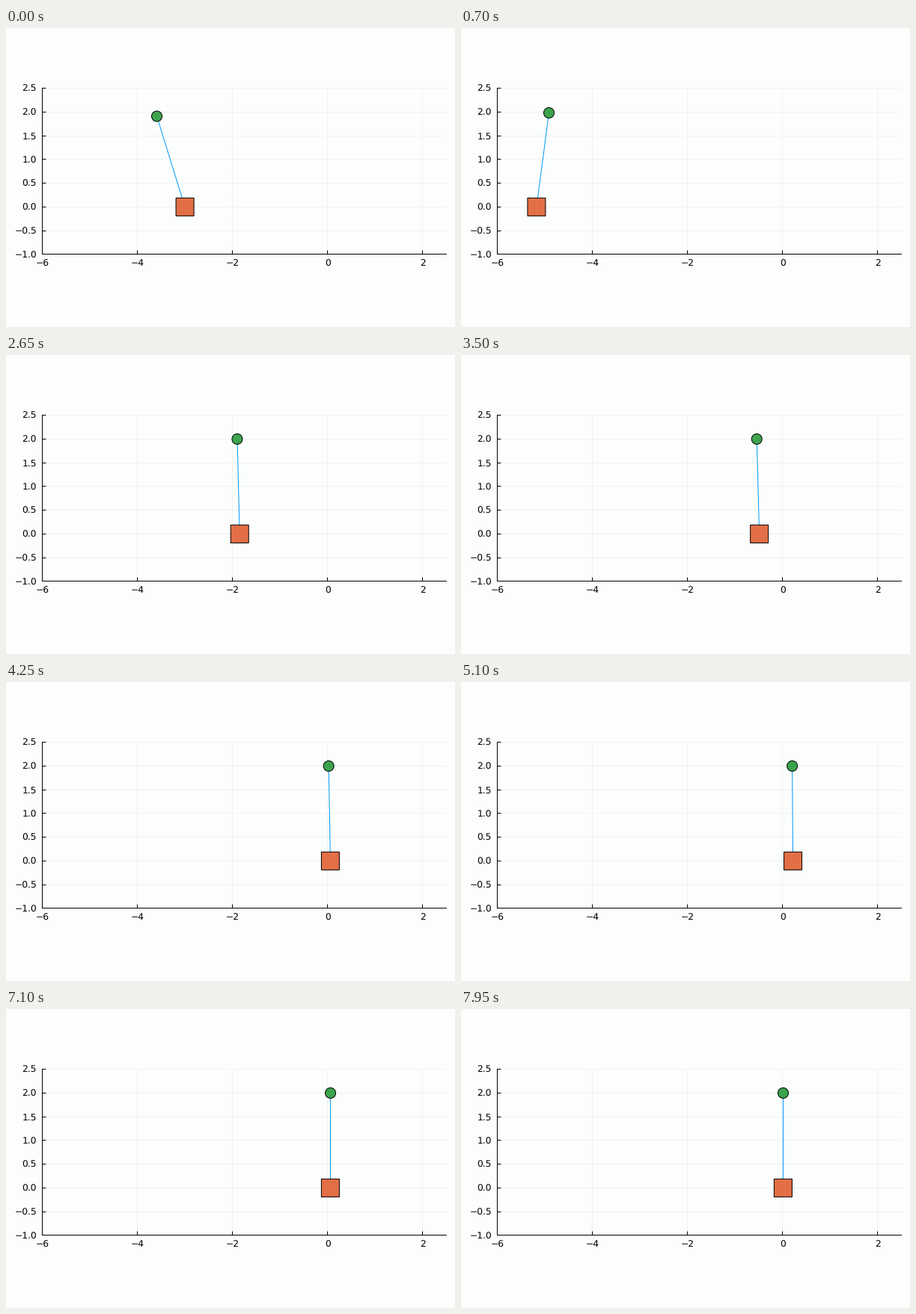
Write a matplotlib script that moves like this. It is 600 px wide and 400 px high and loops after 8 s.

```python
import numpy as np
import matplotlib.pyplot as plt
from matplotlib.animation import FuncAnimation
from matplotlib.patches import Circle, Rectangle

plt.rcParams["text.hinting"] = "none"

W, H, DPI = 600, 400, 100
PX = 72 / DPI                      # one pixel in points
FRAMES, INTERVAL, STEP = 160, 50, 0.1
SCALE, X0, Y0 = 63.5, 429.6, 239.4
LEFT, RIGHT, TOP, BOTTOM = 48, 588, 80, 302
BG = "#fcfefd"

# Balanced pendulum on a cart: the tip obeys tip'' = K * (tip - cart).
LENGTH, GRAVITY = 2.0, 10.0
K = GRAVITY / LENGTH
START_X, START_TILT = -3.0, -0.3
SLOW = -0.3755 + 0.3675j
SLOW_AMP = 15.33 * np.exp(-1j * SLOW.imag * 8.24) / (1 - SLOW**2 / K)


def slow(t, order=0):
    return (SLOW_AMP * SLOW**order * np.exp(SLOW * t)).imag


def fast_mode():
    """Fast pole pair and amplitudes that meet the state at rest."""
    lean = LENGTH * np.sin(START_TILT)
    start = [START_X + lean, 0, K * lean, 0]
    f = [v - slow(0, n) for n, v in enumerate(start)]
    s, p = np.linalg.solve([[f[1], f[0]], [f[2], f[1]]], [-f[2], -f[3]])
    poles = np.roots([1, s, p]).astype(complex)
    return poles, np.linalg.solve([[1, 1], poles], f[:2])


POLES, AMPS = fast_mode()


def tip(t, order=0):
    return slow(t, order) + np.sum(AMPS * POLES**order * np.exp(POLES * t)).real


def pose(i):
    t = i * STEP
    x = tip(t)
    cart = x - tip(t, 2) / K
    return cart, x, np.sqrt(LENGTH**2 - (x - cart) ** 2)


def px(x):
    return X0 + SCALE * x


def py(y):
    return Y0 - SCALE * y


fig = plt.figure(figsize=(W / DPI, H / DPI), dpi=DPI, facecolor=BG)
ax = fig.add_axes([0, 0, 1, 1])
ax.set_xlim(0, W)
ax.set_ylim(H, 0)
ax.axis("off")


def line(xs, ys, **style):
    """Line through whole pixels, counted from the top left."""
    style = {"color": "black", "lw": PX, **style}
    return ax.plot(np.floor(xs), np.floor(ys), **style)[0]


def label(x, y, text, ha):
    ax.text(x, y, text.replace("-", "\u2212"), ha=ha, va="baseline",
            family="DejaVu Sans", fontsize=12.2 * PX)


GRID = dict(color="#f0f2f1", zorder=1)
for v in range(-6, 3, 2):
    x = px(v)
    if v > -6:
        line([x, x], [TOP, BOTTOM], **GRID)
    line([x, x], [BOTTOM, BOTTOM - 5], solid_capstyle="butt")
    label(x, 318.5, str(v), "center")
for v in np.arange(-1, 2.6, 0.5):
    y = py(v)
    if v > -1:
        line([LEFT, RIGHT], [y, y], **GRID)
    line([LEFT, LEFT + 5], [y, y], solid_capstyle="butt")
    label(41, y + 4.5, f"{v:.1f}", "right")
line([LEFT, LEFT], [TOP, BOTTOM])
line([LEFT, RIGHT], [BOTTOM, BOTTOM])

rod = line([], [], color="#009afa", zorder=3)
box = ax.add_patch(Rectangle((0, 0), 24, 24, fc="#e26f46", ec="black",
                             lw=PX, zorder=4, snap=False))
bob = ax.add_patch(Circle((0, 0), 7, fc="#3da44d", ec="black",
                          lw=PX, zorder=5))


def draw(i):
    cart, x, y = pose(i)
    rod.set_data([px(cart), px(x)], [py(0), py(y)])
    box.set_xy((px(cart) - 12, py(0) - 12))
    bob.center = px(x), py(y)
    return rod, box, bob


anim = FuncAnimation(fig, draw, frames=FRAMES, interval=INTERVAL,
                     init_func=lambda: draw(0), repeat=True, repeat_delay=0)
plt.show()
```
